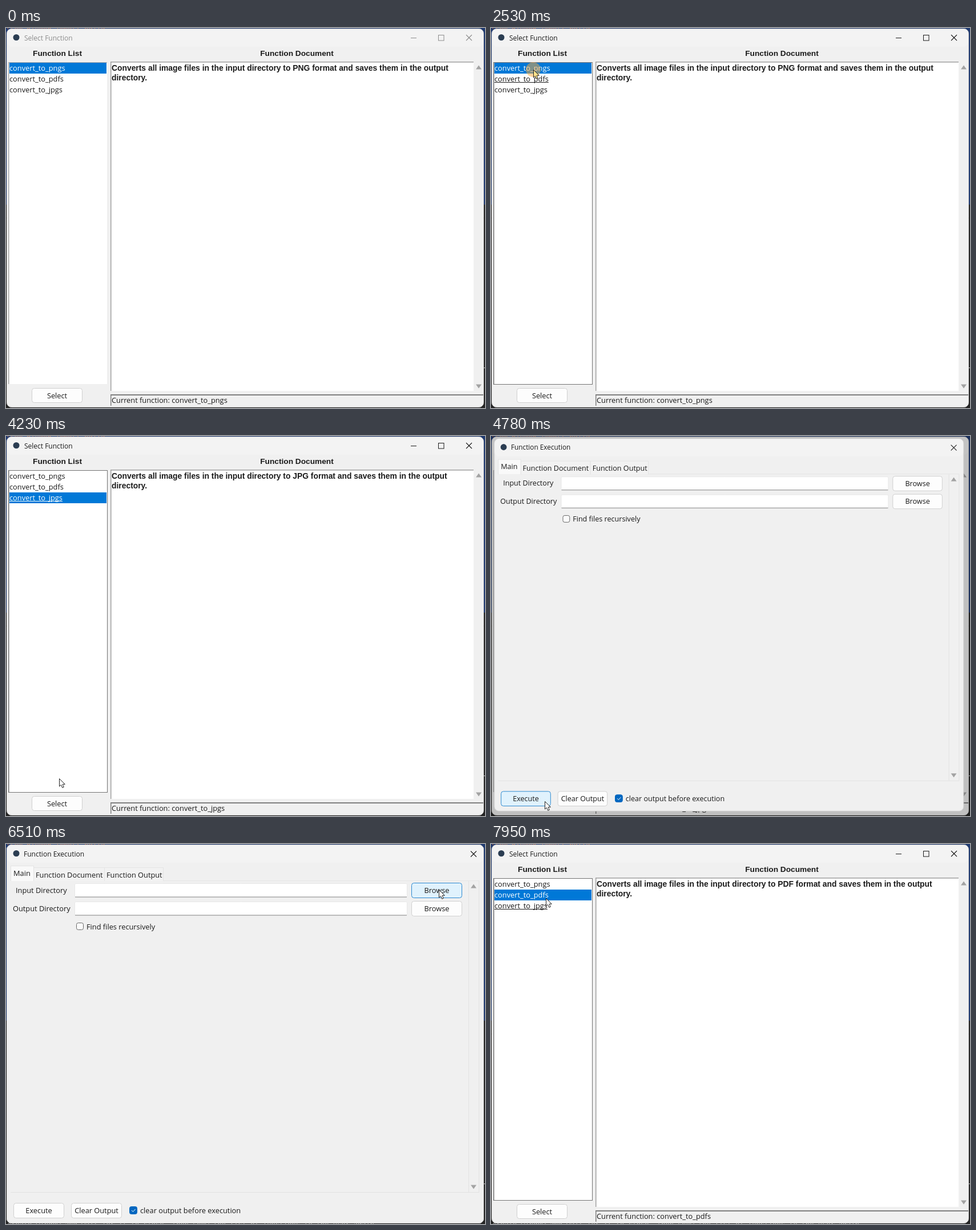
An HTML page with a canvas for the animation above (8 s loop, 839 by 667 pixels).

```html
<!DOCTYPE html>
<html lang="en">
<head>
<meta charset="utf-8">
<title>Function picker</title>
<style>
  html, body { margin: 0; width: 100%; height: 100%; overflow: hidden; background: #202020; }
  canvas { display: block; }
</style>
</head>
<body>
<canvas id="stage" width="839" height="667"></canvas>
<script>
const ctx = document.getElementById('stage').getContext('2d');
const LOOP = 8000;
const UI = '12.8px "Open Sans", sans-serif';
const TITLE = '12px "Open Sans", sans-serif';
const HEADING = 'bold 13.7px "Liberation Sans", Arial, sans-serif';
const DOC = 'bold 13.86px "Liberation Sans", Arial, sans-serif';
const MONO = '12px "DejaVu Sans Mono", monospace';
const INK = '#1a1a1a';
const FORMATS = ['png', 'pdf', 'jpg'];

// Pointer moves: start, end, then where it comes to rest
const MOVES = [
  [280, 350, 265, 565], [580, 850, 315, 425], [850, 1380, 73, 105],
  [2060, 2200, 74, 88], [2330, 2460, 74, 73], [2870, 3000, 74, 89],
  [3150, 3300, 75, 108], [3680, 4440, 94, 641], [4900, 5270, 347, 400],
  [5340, 6110, 758, 80], [6580, 6790, 816, 17], [7080, 7880, 96, 95]
];
const ENTRY = { x: 341, y: 644 };

// List clicks: time of press, chosen row
const PICKS = [[0, 0], [1450, 2], [2200, 1], [2520, 0], [3010, 1], [3370, 2], [7940, 1]];
const ACTIVATE = 1450, SELECT = 4510, DISMISS = 6930, REFOCUS = 7940;
const HALOS = [...PICKS.slice(1, -1).map(pick => pick[0]), SELECT, DISMISS];
const PRESS = 140;
const OPEN = { start: 4630, end: 4880 };
const CLOSE = { start: 7050, end: 7230 };

const clamp = v => Math.max(0, Math.min(1, v));
const easeOut = p => 1 - (1 - p) ** 2;
const progress = (t, span) => clamp((t - span.start) / (span.end - span.start));
const inside = (p, x, y, w, h) => p && p.x >= x && p.x < x + w && p.y >= y && p.y < y + h;

function rect(x, y, w, h, color) {
  ctx.fillStyle = color;
  ctx.fillRect(x, y, w, h);
}

function text(str, x, y, font = UI, color = INK, align = 'left') {
  ctx.font = font;
  ctx.fillStyle = color;
  ctx.textAlign = align;
  ctx.fillText(str, x, y);
}

function disc(x, y, r, color) {
  ctx.beginPath();
  ctx.arc(x, y, r, 0, 7);
  ctx.fillStyle = color;
  ctx.fill();
}

function rounded(x, y, w, h, r, fill, stroke) {
  ctx.beginPath();
  ctx.roundRect(x + .5, y + .5, w - 1, h - 1, r);
  ctx.fillStyle = fill;
  ctx.fill();
  ctx.strokeStyle = stroke;
  ctx.lineWidth = 1;
  ctx.stroke();
}

function line(x1, y1, x2, y2, color, width = 1) {
  ctx.beginPath();
  ctx.moveTo(x1, y1);
  ctx.lineTo(x2, y2);
  ctx.strokeStyle = color;
  ctx.lineWidth = width;
  ctx.stroke();
}

function cross(x, y, color) {
  for (const d of [-5, 5]) line(x - 5, y - d, x + 5, y + d, color, 1.1);
}

function scrollArrow(x, y, dir) {
  ctx.beginPath();
  ctx.moveTo(x - 5, y + 3.5 * dir);
  ctx.lineTo(x + 5, y + 3.5 * dir);
  ctx.lineTo(x, y - 3.5 * dir);
  ctx.fillStyle = '#a3a3a3';
  ctx.fill();
}

function button(label, x, y, w, h, pointer) {
  const hover = inside(pointer, x, y, w, h);
  rounded(x, y, w, h, 4, hover ? '#e0f2fd' : '#fdfdfd', hover ? '#2b88d0' : '#d0d0d0');
  text(label, x + w / 2, y + h / 2 + 4.5, UI, INK, 'center');
}

function windowFrame(title, titleX, color) {
  rounded(1, 1, 836, 665, 8, '#f0f0f0', '#d2d2d2');
  rounded(2, 2, 834, 31, 7, '#f3f3f3', '#f3f3f3');
  disc(18, 16.5, 5.5, '#2b3d52');
  text(title, titleX, 21.5, TITLE, color);
}

function pointerAt(t) {
  if (t < MOVES[0][0]) return null;
  let { x, y } = ENTRY;
  for (const [start, end, toX, toY] of MOVES) {
    const p = easeOut(progress(t, { start, end }));
    x += (toX - x) * p;
    y += (toY - y) * p;
  }
  return { x, y };
}

const rowAt = t => PICKS.findLast(pick => pick[0] <= Math.max(0, t))[1];

function drawBackdrop(t) {
  rect(0, 0, 839, 310, '#1f3a70');
  rect(0, 310, 839, 357, '#242424');
  text('from window import build', 0, 1.5, MONO, '#b8623a');
  rect(836, 596, 3, 1, '#c8c8c8');
  if (t >= 6510) text('create window and wait for it to close, then show the list of functions to the user again', 2, 672, MONO, '#a8a8a8');
}

function drawList(t, selected) {
  const focused = t >= ACTIVATE && t < SELECT || t >= REFOCUS;
  if (focused) {
    rect(4, 60, 174, 566, '#737373');
  } else {
    rect(4, 60, 173, 565, '#a8a8a8');
  }
  rect(5.5, 61, 171.5, 564, '#fff');
  // The active row follows the selected one when the button is released.
  const active = rowAt(t - PRESS);
  FORMATS.forEach((format, row) => {
    const y = 61 + 19 * row;
    const label = `convert_to_${format}s`;
    const color = row === selected ? '#fff' : INK;
    if (row === selected) rect(6, y, 170, 19, '#0078d7');
    text(label, 6, y + 14, UI, color);
    if (focused && row === active) rect(6, y + 15, ctx.measureText(label).width, 1, color);
  });
}

function drawMain(t, pointer) {
  const ink = t >= ACTIVATE ? INK : '#8c8c8c';
  const selected = rowAt(t);
  windowFrame('Select Function', 32, ink);

  const closeGlow = t >= CLOSE.start ? clamp((7400 - t) / 200) : 0;
  ctx.globalAlpha = closeGlow;
  rect(788, 1, 49, 31, '#9e4e38');
  ctx.globalAlpha = 1;
  line(709, 17.5, 719, 17.5, ink);
  ctx.strokeRect(757.5, 12.5, 9.5, 9.5);
  cross(811, 17, closeGlow > .5 ? '#7d5548' : ink);

  text('Function List', 90, 49, HEADING, INK, 'center');
  text('Function Document', 509.5, 49, HEADING, INK, 'center');
  drawList(t, selected);

  rect(183, 59, 636, 578, '#a0a0a0');
  rect(184.5, 60.5, 634.5, 576.5, '#fff');
  text(`Converts all image files in the input directory to ${FORMATS[selected].toUpperCase()} format and saves them in the output`, 185, 75, DOC);
  text('directory.', 185, 92, DOC);
  scrollArrow(828, 69, 1);
  scrollArrow(828, 629, -1);

  button('Select', 45, 632, 89, 26, pointer);
  if (t >= SELECT && t < REFOCUS) {
    ctx.strokeStyle = '#333';
    ctx.strokeRect(48.5, 634.5, 83, 21);
  }
  rect(183, 643, 653, 2, '#808080');
  rect(183, 643, 1.5, 20, '#808080');
  text(`Current function: convert_to_${FORMATS[selected]}s`, 185, 658);
}

function drawTab(label, x, y, w, textX, active) {
  rect(x, y, w, 65 - y, '#e4e4e4');
  rect(x + 1, y + 1, w - 2, 64 - y, active ? '#f9f9f9' : '#f2f2f2');
  text(label, textX, active ? 56 : 58.5);
}

function drawField(label, x, y, pointer) {
  text(label, x, y + 16.5);
  rounded(120, y, 583, 25, 2, '#fff', '#e8e8e8');
  rect(121, y + 23.5, 581, 1, '#858585');
  button('Browse', 710, y - 1, 89, 27, pointer);
}

function drawDialog(t, pointer) {
  windowFrame('Function Execution', 31, INK);
  const hoverClose = t < CLOSE.start && inside(pointer, 796, 0, 42, 33);
  if (hoverClose) rect(796, 1, 41, 32, '#c42b1c');
  cross(819, 17.5, hoverClose ? '#fff' : INK);

  rect(8, 64, 821, 1, '#e6e6e6');
  drawTab('Function Document', 48, 41, 125, 52);
  drawTab('Function Output', 172, 41, 104, 176);
  drawTab('Main', 8, 38, 41, 13, true);
  drawField('Input Directory', 17, 69, pointer);
  drawField('Output Directory', 12, 101, pointer);
  rounded(123, 138, 13, 13, 3, '#fafafa', '#666');
  text('Find files recursively', 141, 149.5);

  for (const x of [810, 828]) rect(x, 65, 1, 546, '#e2e2e2');
  rect(8, 611, 821, 1, '#e2e2e2');
  scrollArrow(819, 74, 1);
  scrollArrow(819, 602, -1);

  button('Execute', 13, 630, 89, 27, pointer);
  button('Clear Output', 114, 630, 89, 27, pointer);
  rounded(216, 636, 14, 14, 3, '#0067c0', '#0067c0');
  line(220, 643, 222.5, 645.5, '#fff');
  line(222.5, 645.5, 226.5, 641, '#fff');
  text('clear output before execution', 235, 648);
}

function placeDialog(t, pointer) {
  if (t < OPEN.start || t >= CLOSE.end) return;
  const opening = progress(t, OPEN), closing = progress(t, CLOSE);
  const leaving = closing > 0;
  const scale = leaving ? 1 - .064 * closing : .9 + .1 * easeOut(opening);
  const [pivotX, pivotY] = leaving ? [360, 304] : [281, 206];
  ctx.save();
  ctx.globalAlpha = leaving ? (1 - closing) ** 1.4 : clamp(opening * 2);
  if (opening < 1) rect(0, 0, 839, 667, 'rgba(0, 0, 0, .2)');
  ctx.translate(pivotX * (1 - scale), pivotY * (1 - scale));
  ctx.scale(scale, scale);
  drawDialog(t, pointer);
  ctx.restore();
}

function drawPointer(t, pointer, dialogOpen) {
  if (!pointer) return;
  const pressed = HALOS.some(start => t >= start && t < start + PRESS);
  const overText = dialogOpen
    ? inside(pointer, 120, 69, 583, 25) || inside(pointer, 120, 101, 583, 25)
    : inside(pointer, 184, 60, 635, 585);
  ctx.save();
  ctx.translate(Math.round(pointer.x), Math.round(pointer.y));
  if (pressed) disc(0, 0, 13, 'rgba(255, 170, 60, .5)');
  if (overText) {
    line(.5, -7, .5, 7, '#222');
    for (const y of [-6.5, 6.5]) line(-3, y, 4, y, '#222');
  } else {
    const arrow = new Path2D('M.5 .5v13.5l3-2.7 2.2 5 2.5-1-2.1-5h4.2z');
    ctx.fillStyle = pressed ? '#ffe48c' : '#fff';
    ctx.fill(arrow);
    ctx.strokeStyle = '#222';
    ctx.lineWidth = 1;
    ctx.stroke(arrow);
  }
  ctx.restore();
}

function draw(t) {
  const pointer = pointerAt(t);
  const dialogOpen = t >= OPEN.start && t < CLOSE.start;
  drawBackdrop(t);
  drawMain(t, dialogOpen ? null : pointer);
  placeDialog(t, pointer);
  drawPointer(t, pointer, dialogOpen);
}

const began = performance.now();
function tick() {
  draw((performance.now() - began) % LOOP);
  requestAnimationFrame(tick);
}
tick();
</script>
</body>
</html>
```
